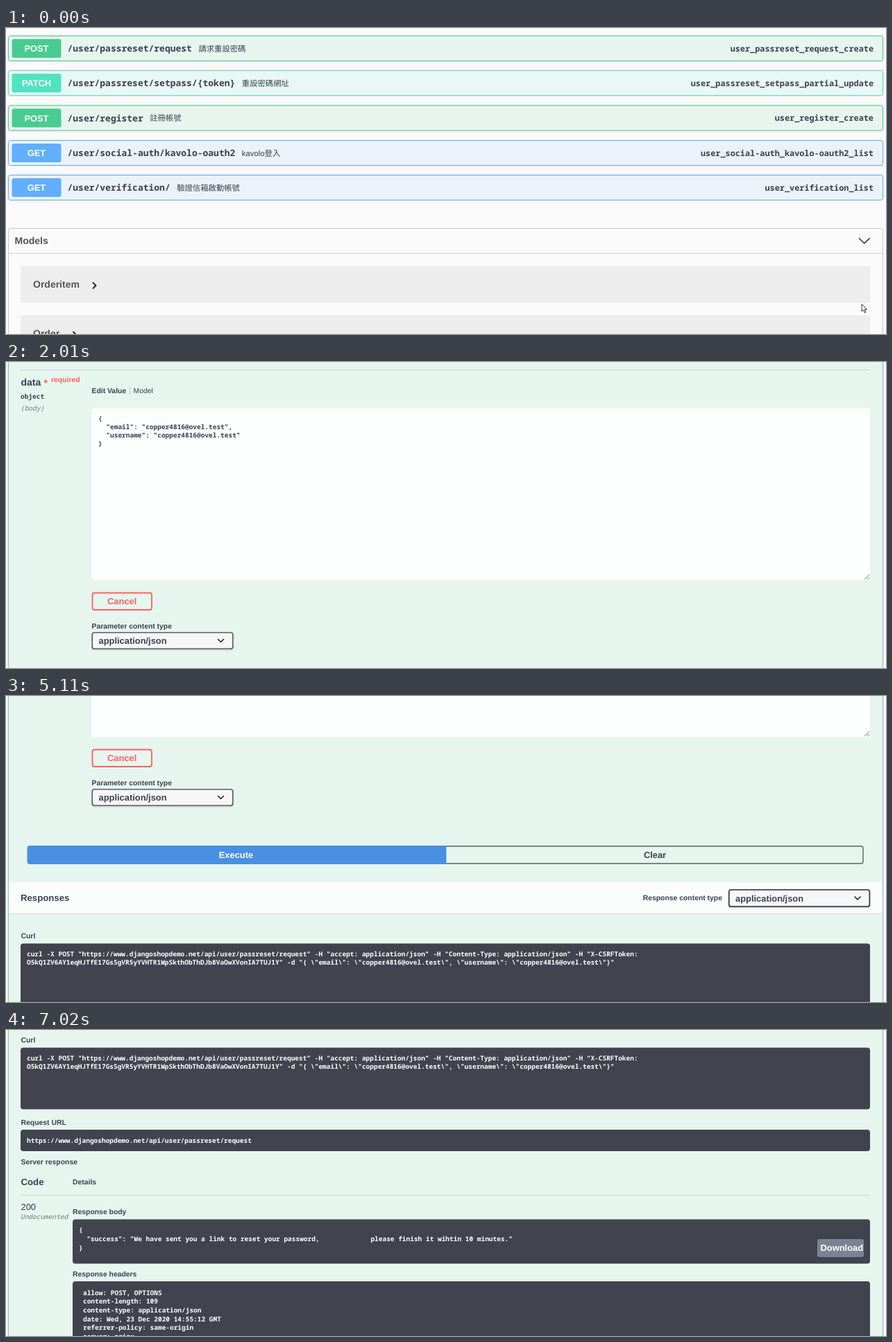
These frames come from a looping animation (1268x442 px, 7550 ms). An HTML page:

```html
<!DOCTYPE html>
<html lang="zh-Hant">
<head>
<meta charset="utf-8">
<title>API docs</title>
<style>
html, body { margin: 0; width: 100%; height: 100%; overflow: hidden; background: #fafafa; }
svg { display: block; width: 100%; height: 100%; }
text {
  font-family: "Liberation Sans", "Noto Sans CJK TC", "Noto Sans CJK", sans-serif;
  fill: #3b4151; white-space: pre; text-rendering: geometricPrecision;
}
.b { font-weight: 700; }
.mono { font: 700 9.473px "Noto Sans Mono", "DejaVu Sans Mono", monospace; }
.note { font-weight: 400; font-style: italic; fill: #777; }
.path { font: 600 13px "Noto Sans Mono", "DejaVu Sans Mono", monospace; }
.op { font: 600 11.87px "Noto Sans Mono", "DejaVu Sans Mono", monospace; text-anchor: end; }
.mid { text-anchor: middle; }
.end { text-anchor: end; }
.verb { font-size: 12.8px; }
.verb, .white { fill: #fff; }
.red { fill: #ff6060; }
.s10 { font-size: 10.4px; }
.s11 { font-size: 11.35px; }
.s13 { font-size: 12.9px; }
.head { font-size: 13.2px; }
.s14 { font-size: 14px; }
.grey { fill: #555; }
.line { fill: none; stroke-linecap: round; stroke-linejoin: round; }

#list, #detail, #scroll, #ready, #sent, #cursor { animation: 7550ms step-end infinite; }
#list { animation-name: hide-list; }
#detail { animation-name: show-detail; }
#scroll { animation-name: scroll; }
#ready { animation-name: hide-ready; }
#sent { animation-name: show-sent; }
#cursor { animation-name: point; }

@keyframes hide-list { 0% { opacity: 1; } 11.92%, 100% { opacity: 0; } }
@keyframes show-detail { 0% { opacity: 0; } 11.92%, 100% { opacity: 1; } }
@keyframes hide-ready { 0% { opacity: 1; } 52.84%, 100% { opacity: 0; } }
@keyframes show-sent { 0% { opacity: 0; } 52.84%, 100% { opacity: 1; } }
@keyframes scroll {
  0% { transform: translateY(0); }
  22.11% { transform: translateY(-40px); }
  23.57% { transform: translateY(-95px); }
  25.03% { transform: translateY(-150px); }
  26.62% { transform: translateY(-205px); }
  28.07% { transform: translateY(-240px); }
  29.53% { transform: translateY(-262px); }
  35.23% { transform: translateY(-268px); }
  36.82% { transform: translateY(-273px); }
  38.41% { transform: translateY(-276px); }
  67.68% { transform: translateY(-461px); }
  69.13% { transform: translateY(-540px); }
  70.59% { transform: translateY(-615px); }
  72.18% { transform: translateY(-687px); }
  73.64% { transform: translateY(-730px); }
  75.09% { transform: translateY(-762px); }
  78.14% { transform: translateY(-785px); }
  82.51%, 100% { transform: translateY(-793px); }
}
@keyframes point {
  0% { transform: translate(1232px, 398px); }
  1.32% { transform: translate(1232px, 398px); animation-timing-function: steps(7, start); }
  11.92% { transform: translate(908px, 20px); }
  13.37% { transform: translate(1100px, 90px); }
  14.83% { transform: translate(1320px, 318px); }
  35.23% { transform: translate(1320px, 318px); animation-timing-function: steps(7, start); }
  45.82% { transform: translate(479px, 391px); animation-timing-function: steps(3, start); }
  50.19% { transform: translate(330px, 408px); }
  54.43% { transform: translate(1250px, 318px); }
  56.02% { transform: translate(1320px, 428px); }
  88.47% { transform: translate(1259px, 428px); }
  89.93% { transform: translate(1254px, 418px); }
  91.39% { transform: translate(1252px, 412px); }
  92.98%, 100% { transform: translate(1320px, 428px); }
}
</style>
</head>
<body>
<svg id="stage" viewBox="0 0 1268 442" preserveAspectRatio="none"></svg>
<script>
const GREEN = '#49cc90', MINT = '#50e3c2', BLUE = '#61affe', INK = '#41444e';
const EMAIL = 'copper4816@ovel.test';
const API = 'https://www.djangoshopdemo.net/api/user/passreset/request';

const escapeText = s => s.replace(/&/g, '&amp;').replace(/</g, '&lt;').replace(/>/g, '&gt;');
const text = (x, y, cls, s) => `<text x="${x}" y="${y}" class="${cls}">${escapeText(s)}</text>`;
const lines = (x, y, pitch, cls, list) => list.map((s, i) => text(x, y + i * pitch, cls, s)).join('');
const box = (x, y, w, h, fill, more = '') =>
  `<rect x="${x}" y="${y}" width="${w}" height="${h}" fill="${fill}" ${more}/>`;
const stroke = (d, color, width = 1) =>
  `<path class="line" d="${d}" stroke="${color}" stroke-width="${width}"/>`;
const shadow = 'style="filter:drop-shadow(0 1px 1px rgba(0,0,0,.22))"';

// Header row of one endpoint.
function row(y, verb, color, path, note, op) {
  return box(8.5, y + 5, 71, 27, color, 'rx="3"') +
    text(44, y + 23, 'b verb mid', verb) +
    text(88.5, y + 23, 'path', path) +
    text(88.5 + path.length * 7.8 + 9.5, y + 22.5, 's11', note) +
    text(1250, y + 22.5, 'op', op);
}

const frame = (y, h, color, fill) =>
  box(3.5, y + .5, 1260, h, fill, `rx="3" stroke="${color}" style="filter:drop-shadow(0 0 1px rgba(0,0,0,.15))"`);

function cancel(x, y) {
  return box(x + 1, y + 1, 85.5, 24.5, 'none', 'rx="3" stroke="#ff6060" stroke-width="1.8"') +
    text(x + 43.7, y + 17.2, 'b s13 red mid', 'Cancel');
}

function select(x, y, h, width) {
  return box(x + .8, y + .8, 202.5, h - 1.6, '#f7f7f7', `rx="3" stroke="${INK}" stroke-width="${width}" ${shadow}`) +
    text(x + 10, y + h / 2 + 4.5, 'b verb', 'application/json').replace('verb', 's13') +
    stroke(`M${x + 182} ${y + h / 2 - 2}l4 4 4-4`, '#222', 1.6);
}

const band = (y, title) =>
  box(4, y, 1259, 45, '#fbfdfc') + box(4, y + 45, 1259, 1, '#d0dfd9') +
  text(21, y + 27, 'b head', title);

const dark = (x, y, h) => box(x, y, 1245 - x, h, INK, 'rx="4"');
const rule = y => box(21, y, 1224, 1, '#c8d6d0');

const model = (y, name, arrowX) =>
  box(21, y, 1224, 53, '#ededed', 'rx="4"') + text(39, y + 31, 'b s14 grey', name) +
  stroke(`M${arrowX} ${y + 24}l4 4-4 4`, '#222', 1.8);

const rows = [
  [11, 'POST', GREEN, '#e8f5ef', '/user/passreset/request', '請求重設密碼', 'user_passreset_request_create'],
  [61, 'PATCH', MINT, '#e9f8f4', '/user/passreset/setpass/{token}', '重設密碼網址', 'user_passreset_setpass_partial_update'],
  [111.5, 'POST', GREEN, '#e8f5ef', '/user/register', '註冊帳號', 'user_register_create'],
  [162, 'GET', BLUE, '#ebf2fa', '/user/social-auth/kavolo-oauth2', 'kavolo登入', 'user_social-auth_kavolo-oauth2_list'],
  [212, 'GET', BLUE, '#ebf2fa', '/user/verification/', '驗證信箱啟動帳號', 'user_verification_list']
];

const list = rows.map(([y, verb, color, fill, ...rest]) =>
    frame(y, 36, color, fill) + row(y, verb, color, ...rest)).join('') +
  box(3.5, 289.5, 1260, 300, 'none', 'rx="3" stroke="#c6c8cb"') +
  box(4, 325, 1259, 1, '#cfd0d2') +
  text(12.5, 312, 'b s14 grey', 'Models') +
  stroke('M1229.5 304l7.3 7 7.3-7', '#333', 1.7) +
  model(344, 'Orderitem', 125.5) + model(415, 'Order', 97);

const [first] = rows;
const request =
  frame(11, 1500, '#8cc3ab', '#e7f5ef') +
  row(first[0], first[1], first[2], ...first.slice(4)) +
  box(4, 47, 1259, 1, '#7fc6a6') +
  `<g style="font-size:12.77px">${text(21.5, 86.5, '', '確認帳號和以及對應信箱後，寄出能修改密碼的網址。用戶可在十分鐘內來到該網址修改密碼，十分鐘後該網址作廢。')}</g>` +
  band(120, 'Parameters') + cancel(1158, 129) +
  text(21.5, 203, 'b s10', 'Name') + text(123.5, 203, 'b s10', 'Description') + rule(216) +
  text(21.5, 239, 'b s14', 'data') + text(54.5, 240, 'b s14 red', '*') + text(65, 234, 'b s10 red', 'required') +
  text(21, 258, 'mono', 'object') + text(21, 275, 'mono note', '(body)') +
  text(123.5, 250, 'b s10', 'Edit Value') + box(178, 240, 1, 13, '#c3cbc9') + text(183.5, 250, 's10', 'Model') +
  box(123.5, 271.5, 1121.5, 249, '#fbfefd', 'rx="4"') +
  lines(133, 289.5, 12, 'mono', ['{', `  "email": "${EMAIL}",`, `  "username": "${EMAIL}"`, '}']) +
  stroke('M1237 519l7-7M1241 519l3-3', '#777', .9) +
  cancel(123.5, 537.5) +
  text(123.5, 590, 'b s10', 'Parameter content type') + select(123.5, 595, 25, 1.3);

const buttons =
  `<g id="ready">${box(30.5, 677, 1205.5, 27, '#4990e2', 'rx="4"')}${text(633, 694.5, 'b s13 white mid', 'Execute')}</g>` +
  `<g id="sent">${box(631, 678, 604, 25, '#e7f5ef', 'rx="3" stroke="#7d8583" stroke-width="1.8"')}` +
  box(30.5, 677, 604, 27, '#4990e2', 'rx="4"') + box(620, 677, 14, 27, '#4990e2') +
  text(331.5, 694.5, 'b s13 white mid', 'Execute') + text(935, 694.5, 'b s13 mid', 'Clear') + '</g>';

const response =
  band(730, 'Responses') +
  text(1032, 756, 'b s10 end', 'Response content type') + select(1041, 740, 26, 1.8) +
  text(21.5, 811, 'b s10', 'Curl') + dark(21, 818.5, 89) +
  lines(30, 837, 12.2, 'mono white', [
    `curl -X POST "${API}" -H "accept: application/json" -H "Content-Type: application/json" -H "X-CSRFToken:`,
    `O5kQ1ZV6AY1eqHJTfE17GsSgVR5yYVHTR1WpSkthObThDJb8VaOwXVonIA7TUJ1Y" -d "{ \\"email\\": \\"${EMAIL}\\", \\"username\\": \\"${EMAIL}\\"}"`
  ]) +
  text(21.5, 930, 'b s10', 'Request URL') + dark(21, 937, 31) + text(30, 956, 'mono white', API) +
  text(21.5, 987, 'b s10', 'Server response') +
  text(21.5, 1017, 'b head', 'Code') + text(96, 1016, 'b s10', 'Details') + rule(1031) +
  text(21.5, 1052.5, 's13', '200') + text(21, 1066, 'mono note', 'Undocumented') +
  text(96, 1059, 'b s10', 'Response body') + dark(96, 1066.5, 64) +
  lines(105, 1085, 12.8, 'mono white', [
    '{',
    `  "success": "We have sent you a link to reset your password,${' '.repeat(13)}please finish it wihtin 10 minutes."`,
    '}'
  ]) +
  box(1169, 1095, 67, 26, '#7d8293', 'rx="3"') + text(1173.5, 1111.5, 'b s13 white', 'Download') +
  text(96, 1149, 'b s10', 'Response headers') + dark(96, 1156, 130) +
  lines(111, 1175.5, 12.7, 'mono white', [
    'allow: POST, OPTIONS', 'content-length: 109', 'content-type: application/json',
    'date: Wed, 23 Dec 2020 14:55:12 GMT', 'referrer-policy: same-origin', 'server: nginx'
  ]);

document.getElementById('stage').innerHTML =
  `<g id="list">${list}</g>` +
  `<g id="detail"><g id="scroll">${request}${buttons}${response}</g></g>` +
  '<path id="cursor" d="M1 .8V11.4L3.5 9.1 5.3 13.3 7 12.5 5.2 8.5H8.6Z" fill="#fff" stroke="#222" stroke-width=".9"/>';
</script>
</body>
</html>
```
